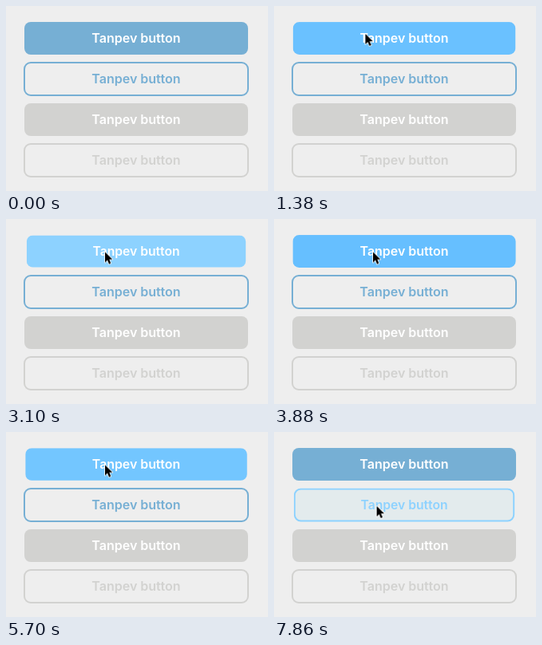
An HTML page that plays this animation: 328 by 232 pixels, repeating every 8 s.

```html
<!DOCTYPE html>
<html lang="en">
<head>
<meta charset="utf-8">
<title>Button states</title>
<style>
  :root {
    --blue: #76afd4;
    --hover: #66bfff;
    --press: #8dd2ff;
    --grey: #d2d2d0;
    --loop: 8s infinite;
  }
  html, body {
    margin: 0;
    width: 100%;
    height: 100%;
    overflow: hidden;
    background: #eee;
  }
  .btn {
    position: absolute;
    box-sizing: border-box;
    left: 23px;
    width: 280px;
    height: 41px;
    border-radius: 8px;
    color: #fff;
    font: 600 16px/41px Inter, "Open Sans", sans-serif;
    text-align: center;
    white-space: nowrap;
    cursor: default;
    user-select: none;
  }
  .outline {
    left: 22px;
    width: 282px;
    height: 43px;
    border: 2px solid;
    border-radius: 9px;
    line-height: 39px;
  }
  .solid { top: 20px; background: var(--blue); animation: solid var(--loop) ease; }
  .line { top: 70px; color: var(--blue); animation: line var(--loop) ease; }
  .solid-off { top: 122px; background: var(--grey); }
  .line-off { top: 172px; color: var(--grey); }

  .pointer {
    position: absolute;
    left: 0;
    top: 0;
    width: 14px;
    height: 20px;
    overflow: visible;
    pointer-events: none;
    animation: move var(--loop) ease-in-out, show var(--loop) step-end;
  }
  .pointer path {
    fill: #000;
    stroke: #fff;
    stroke-width: 1.6;
    stroke-linejoin: round;
    paint-order: stroke;
  }

  /* rest, hover, press */
  @keyframes solid {
    0%, 4.5%, 22.6%, 30%, 77%, 100% {
      background: var(--blue); transform: none;
    }
    6.5%, 10%, 18%, 20.6%, 32%, 36.25%, 47.5%, 51.25%, 61.25%, 65.25%, 72.5%, 75% {
      background: var(--hover); transform: scale(.997);
    }
    12.25%, 16%, 38.5%, 45.25%, 53.25%, 59.25%, 67.25%, 70.5% {
      background: var(--press); transform: scale(.98);
    }
  }
  @keyframes line {
    0%, 3%, 6%, 21.6%, 31%, 75.8% {
      color: var(--blue); background: #eee; transform: none;
    }
    4% {
      color: #70b5e4; background: #ebebeb; transform: scale(.999);
    }
    23.6%, 29%, 77.8%, 83.75%, 91%, 96.25% {
      color: var(--hover); background: #e7e7e7; transform: scale(.997);
    }
    85.75%, 89%, 98.25%, 100% {
      color: var(--press); background: #e3ebed; transform: scale(.98);
    }
  }
  @keyframes move {
    0%, 3% { transform: translate(10px, 105px); animation-timing-function: ease-out; }
    8.5%, 17.5% { transform: translate(114.4px, 35px); }
    24.25% { transform: translate(113px, 90px); }
    27.25% { transform: translate(113px, 90px); animation-timing-function: ease-in; }
    30% { transform: translate(119.3px, 60px); animation-timing-function: ease-out; }
    33%, 72.5% { transform: translate(124px, 41.5px); }
    78.5%, 100% { transform: translate(128.6px, 93px); }
  }
  @keyframes show {
    0% { opacity: 0; }
    3%, 100% { opacity: 1; }
  }
</style>
</head>
<body>
  <div class="btn solid">Tanpev button</div>
  <div class="btn outline line">Tanpev button</div>
  <div class="btn solid-off">Tanpev button</div>
  <div class="btn outline line-off">Tanpev button</div>
  <svg class="pointer" viewBox="0 0 14 20"><path d="M0 0V13l3-2.9 2 4.9 2.3-1-2-4.8h4z"/></svg>
</body>
</html>
```
